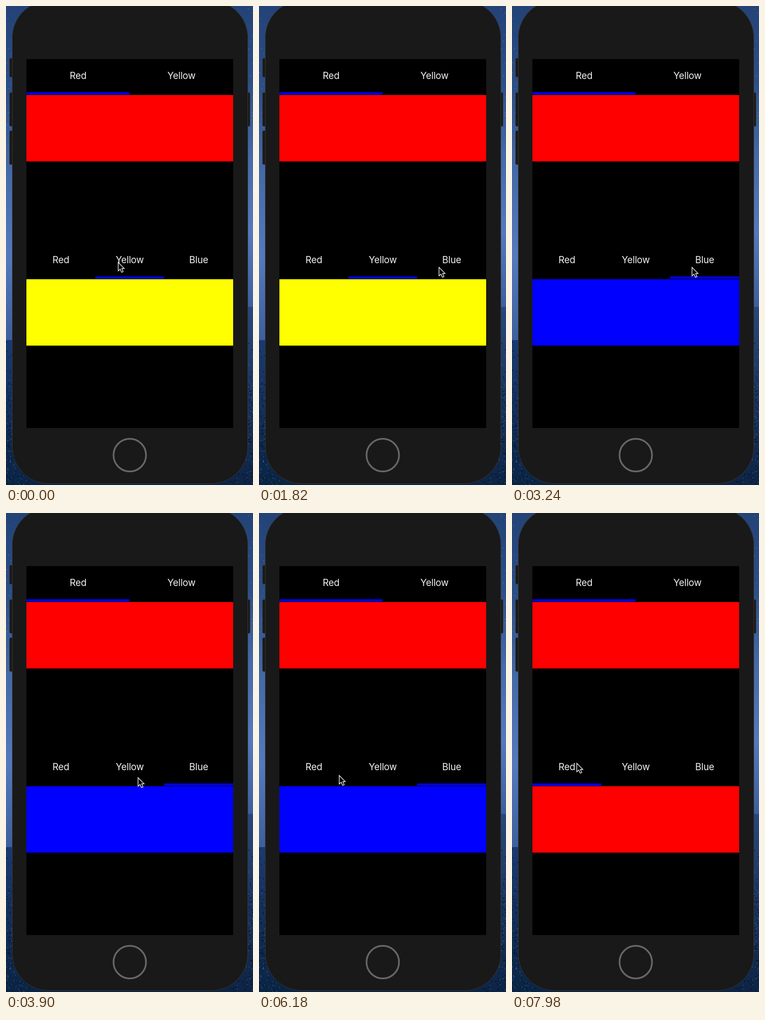
Animation of 448 by 866 pixels, one loop 8 s. Source, as an HTML page with a canvas:

```html
<!DOCTYPE html>
<html lang="en">
<head>
<meta charset="utf-8">
<title>Tab bars</title>
<style>
html, body { margin: 0; width: 100%; height: 100%; overflow: hidden; background: #000; }
canvas { display: block; width: 448px; height: 866px; }
</style>
</head>
<body>
<canvas id="stage" width="448" height="866"></canvas>
<script>
const ctx = document.getElementById('stage').getContext('2d');
const LOOP = 8000, W = 448, H = 866;
const SCREEN = { x: 37, y: 96, w: 375, h: 667 };
const COLORS = { Red: '#ff0000', Yellow: '#ffff00', Blue: '#0000ff' };
const INK = '#f2f2f2';
const ARROW = new Path2D('M0 0V15.5L3.6 12.2L6.2 18L9 16.8L6.6 11.2H11Z');

const HOME = { x: 203, y: 463 };
const MOVES = [
  { from: 20, to: 740, x: 315, y: 477 },
  { from: 840, to: 1420, x: 326, y: 472 },
  { from: 3240, to: 4760, x: 109, y: 486 },
  { from: 5480, to: 6180, x: 145, y: 474 },
  { from: 6300, to: 7020, x: 100, y: 451 },
  { from: 7940, to: 7980, x: 117, y: 452 }
];

function rect(color, x, y, w, h) {
  ctx.fillStyle = color;
  ctx.fillRect(x, y, w, h);
}

function strip(x, w, horizon, sky, ground) {
  const g = ctx.createLinearGradient(0, 0, 0, H);
  sky.forEach((color, i) => g.addColorStop(i / (sky.length - 1) * horizon / H, color));
  ground.forEach((color, i) => g.addColorStop((horizon + i * (H - horizon)) / H, color));
  rect(g, x, 0, w, H);
}

function seeded(seed) {
  return () => (seed = (seed * 16807) % 2147483647) / 2147483647;
}

function drawWallpaper() {
  const sky = ['#234377', '#2c4f88', '#456aa9', '#5579bd', '#3d5f9f'];
  strip(0, W / 2, 604, sky, ['#1b3a70', '#0a2444']);
  strip(W / 2, W / 2, 544, sky, ['#29477c', '#0d2445']);

  const rand = seeded(11);
  const edgeX = side => side ? W - 1 - Math.floor(rand() * 9) : Math.floor(rand() * 9);
  for (let i = 0; i < 22; i++)
    rect('rgba(190,205,230,0.5)', edgeX(i % 2), Math.floor(rand() * 270), 1, 1);

  // Foliage, denser toward the lower corners
  for (let i = 0; i < 320; i++) {
    const y = 600 + Math.floor(Math.sqrt(rand()) * 266);
    const reach = 12 + Math.max(0, y - 800) * 0.6;
    const dx = Math.floor(rand() * reach);
    rect(i % 3 ? 'rgba(2,12,28,0.5)' : 'rgba(65,100,150,0.4)', i % 2 ? W - 2 - dx : dx, y, 2, 2);
  }
}

function drawCase(x, y, w, h, r) {
  ctx.fillStyle = '#191919';
  ctx.strokeStyle = '#333';
  ctx.lineWidth = 1;
  ctx.beginPath();
  ctx.roundRect(x, y, w, h, r);
  ctx.fill();
  ctx.stroke();
}

function drawPhone() {
  drawCase(6.5, 94.5, 9, 34, 2);
  drawCase(6.5, 225.5, 9, 61, 2);
  for (const x of [6.5, 433.5]) drawCase(x, 156.5, 9, 61, 2);
  drawCase(11.5, -9, 427, 872.5, 66);

  ctx.strokeStyle = '#686868';
  ctx.lineWidth = 3;
  ctx.beginPath();
  ctx.arc(224.5, 812, 29.5, 0, 2 * Math.PI);
  ctx.stroke();
  rect('#000', SCREEN.x, SCREEN.y, SCREEN.w, SCREEN.h);
}

function drawTabs(labels, picked, top) {
  const w = SCREEN.w / labels.length;
  ctx.font = '17px Inter, Roboto, sans-serif';
  ctx.letterSpacing = '-0.2px';
  ctx.textAlign = 'center';
  ctx.fillStyle = INK;
  labels.forEach((label, i) => ctx.fillText(label, SCREEN.x + w * (i + 0.5), top + 35.5));
  rect(COLORS.Blue, SCREEN.x + w * picked, top + 60, Math.floor(w), 4);
  rect(COLORS[labels[picked]], SCREEN.x, top + 65, SCREEN.w, 120);
}

function pointerAt(t) {
  let { x, y } = HOME;
  for (const m of MOVES) {
    const u = Math.min(1, Math.max(0, (t - m.from) / (m.to - m.from)));
    const k = u * u * (3 - 2 * u);
    x += (m.x - x) * k;
    y += (m.y - y) * k;
  }
  return [Math.round(x), Math.round(y)];
}

function drawPointer(x, y) {
  ctx.save();
  ctx.translate(x + 0.5, y + 0.5);
  ctx.fillStyle = '#000';
  ctx.fill(ARROW);
  ctx.strokeStyle = INK;
  ctx.lineWidth = 1.2;
  ctx.stroke(ARROW);
  ctx.restore();
}

function draw(t) {
  const picked = t < 2080 ? 1 : t < 7280 ? 2 : 0;
  drawWallpaper();
  drawPhone();
  drawTabs(['Red', 'Yellow'], 0, 96);
  drawTabs(['Red', 'Yellow', 'Blue'], picked, 429);
  drawPointer(...pointerAt(t));
}

const start = performance.now();
function tick() {
  draw((performance.now() - start) % LOOP);
  requestAnimationFrame(tick);
}
tick();
</script>
</body>
</html>
```
